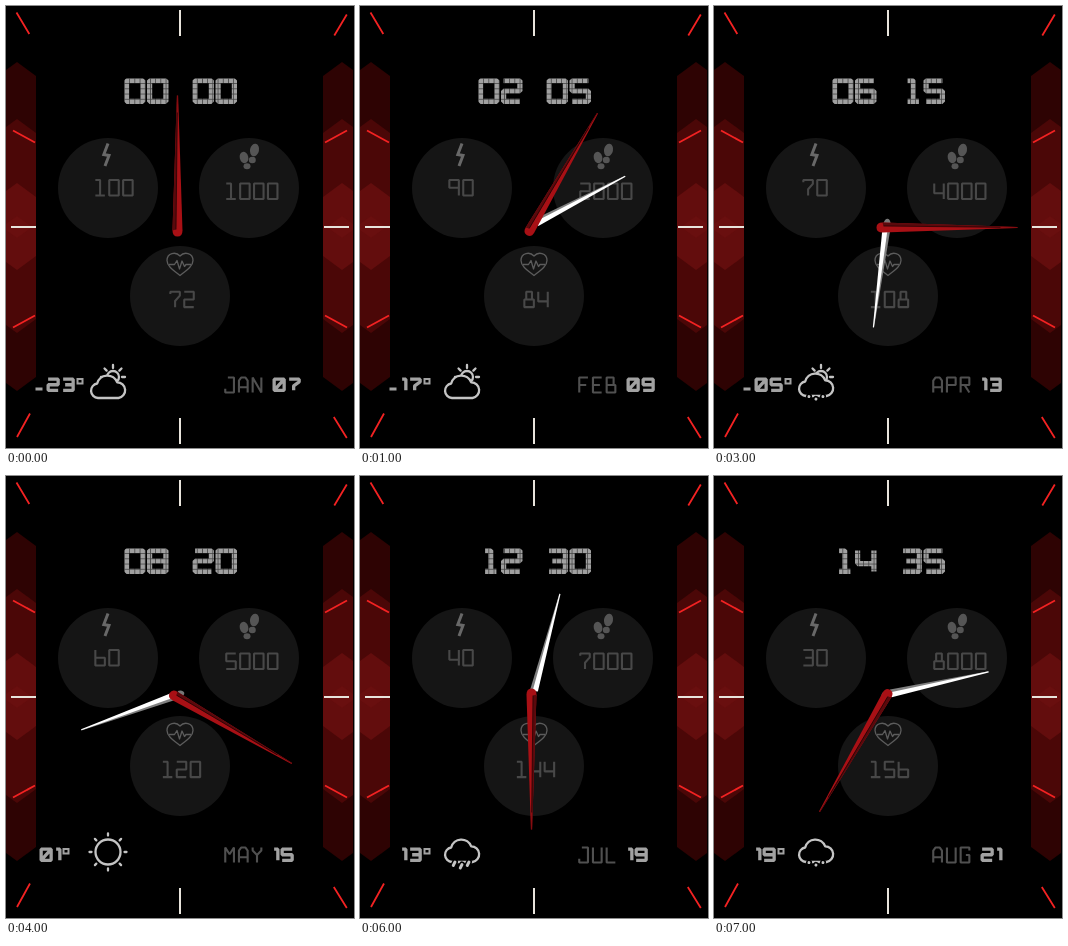
Recreate the animation shown at these times as an HTML page. Size 348x442 px, loop 8000 ms.

```html
<!DOCTYPE html>
<html lang="en">
<head>
<meta charset="utf-8">
<title>Watch face</title>
<style>
  html, body { margin: 0; width: 100%; height: 100%; overflow: hidden; background: #000; }
  svg { display: block; width: 348px; height: 442px; }
  .glyph { fill: none; stroke-linejoin: bevel; }
  .glyph path { vector-effect: non-scaling-stroke; }
  .line { fill: none; stroke: #c4c4c4; stroke-width: 2.3; stroke-linecap: round; stroke-linejoin: round; }
</style>
</head>
<body>
<svg viewBox="0 0 348 442" role="img" aria-label="Watch face">
  <defs>
    <pattern id="tile" width="5.2" height="5.2" x="118" y="72" patternUnits="userSpaceOnUse">
      <path d="M0 .4H5.2M.4 0V5.2" stroke="#000" stroke-width=".8" opacity=".6"/>
    </pattern>
    <g id="panel">
      <path fill="#2e0303" d="M0 64L11 56L30 70V371L11 385L0 377Z"/>
      <path fill="#4b0707" d="M0 121L11 113L30 127V313L11 327L0 319Z"/>
      <path fill="#630d0d" d="M0 185L11 177L30 191V250L11 264L0 256Z"/>
      <path fill="#690f0f" d="M0 218L11 210L26 221L11 232L0 224Z"/>
    </g>
    <path id="cloud" d="M92 392a7.300 7.300 0 0 1-.8-14.500a10.500 10.500 0 0 1 20-1.200a7.900 7.900 0 0 1 1.300 15.700z" fill="#000"/>
  </defs>
  <rect width="348" height="442"/>
  <use href="#panel"/>
  <use href="#panel" transform="matrix(-1 0 0 1 347 0)"/>
  <path stroke="#f22222" stroke-width="1.8" d="M10.500 6.500L23.300 28M340.800 8.500L328.300 29.500M7 124.500L29 136.500M341 124.500L319 136.500M7 321.500L29 309.500M341 321.500L319 309.500M11 431L24 407.500M327.800 411L340.800 432"/>
  <path stroke="#e8e4dc" stroke-width="2" d="M174 4V30M174 412V438M5 221H30M318 221H343"/>
  <g fill="#151515">
    <circle cx="102" cy="182" r="50"/><circle cx="243" cy="182" r="50"/><circle cx="174" cy="290" r="50"/>
  </g>
  <path fill="none" stroke="#686868" stroke-width="3" d="M102 137.500L97.800 148.500L103 149.500L99 160"/>
  <g fill="#555">
    <ellipse cx="238" cy="151.500" rx="4.300" ry="5.700" transform="rotate(-14 238 151.500)"/>
    <ellipse cx="241" cy="160.200" rx="3.500" ry="3"/>
    <ellipse cx="248.500" cy="144" rx="4.500" ry="6.300" transform="rotate(12 248.500 144)"/>
    <ellipse cx="246.300" cy="154" rx="3.500" ry="3.200"/>
  </g>
  <g fill="none" stroke="#5c5c5c" stroke-width="1.300" stroke-linejoin="round">
    <path d="M174 250C170 245.500 161 246.500 161 254.500C161 260 167 264 174 269.500C181 264 187 260 187 254.500C187 246.500 178 245.500 174 250Z"/>
    <path d="M163 258.500H168.500L171 254.500L173.500 263L176 255L178.500 260.500L180 258.500H185"/>
  </g>
  <g id="data"></g>
  <g id="hour">
    <path fill="#777" d="M-3.500 0A3.500 5.500 0 0 0 3.500 0Z"/>
    <path fill="#808080" d="M-.6-104L-4-4L0-3V-104Z"/>
    <path fill="#fff" d="M-.5-104H.6L4-4L-1.200-3Z"/>
  </g>
  <g id="minute">
    <path fill="#a81015" d="M-.6-132H.6L5 3Q5 9 0 9Q-5 9-5 3Z"/>
    <path fill="#5a090c" d="M-.6-132L-5 3L-1.500 2L0-132Z"/>
    <path stroke="#180203" stroke-width=".7" d="M-.2-115L-1.500 2"/>
  </g>
</svg>
<script>
// Glyphs live on a grid 2 wide and 4 high.
const glyphs = {
  0: "M0 0H2V4H0Z", 1: "M0 0H1V4M0 4H2", 2: "M0 0H2V2H0V4H2", 3: "M0 0H2V4H0M.4 2H2",
  4: "M0 0V2.500H2M2 0V4", 5: "M2 0H0V2H2V4H0", 6: "M2 0H0V4H2V2H0", 7: "M0 .6V0H2V1L1 2.400V4",
  8: "M0 0H2V4H0ZM0 2H2", 9: "M2 2H0V0H2V4H0",
  A: "M0 4V.8L.5 0H1.500L2 .8V4M0 2.600H2", B: "M0 2H1.600V0H0V4H2V2H1.600", E: "M2 0H0V4H2M0 2H1.600",
  F: "M2 0H0V4M0 2H1.600", G: "M2 .8V0H0V4H2V2H1.200", J: "M.6 0H2V4H0V3", L: "M0 0V4H2",
  M: "M0 4V0L1 1.800L2 0V4", N: "M0 4V0L2 4V0", P: "M0 4V0H2V2H0", R: "M0 4V0H2V2H0M.9 2L2 4",
  U: "M0 0V4H2V0", Y: "M0 0V.8L1 2L2 .8V0M1 2V4"
};
const thin = { ...glyphs, 6: "M0 0V4H2V2H0", 8: "M.4 0H1.600V2H2V4H0V2H.4ZM.4 2H1.600", 9: "M2 2H0V0H2V4" };
const bold = { ...glyphs, 0: glyphs[0] + "M.3 3.400L1.700 .6", 1: "M0 0H2V4", 7: "M0 0H2V1L.9 2.400V4" };

const styles = {
  clock: { set: glyphs, w: 21.5, h: 26, sw: 5.2, step: 23, color: "#a0a0a0", one: 16.5, pad: 4.5 },
  value: { set: thin, w: 11.6, h: 17.5, sw: 2.1, step: 13.9, color: "#484848" },
  small: { set: bold, w: 13.3, h: 14.5, sw: 3.3, step: 15, color: "#a2a2a2", one: 7, oneStep: 8 },
  month: { set: glyphs, w: 10.8, h: 17, sw: 2.1, step: 13.7, color: "#505050" }
};
const months = ["JAN", "FEB", "MAR", "APR", "MAY", "JUN", "JUL", "AUG"];
const skies = ["fair", "fair", "showers", "flurries", "sun", "cloud", "rain", "snow"];

const pad = n => String(n).padStart(2, "0");

function word(text, x, y, name) {
  const s = styles[name];
  let out = "";
  for (const c of String(text)) {
    const narrow = c === "1" && s.one;
    const w = narrow ? s.one : s.w;
    const left = x + (narrow && s.pad || 0) + s.sw / 2;
    out += `<path d="${s.set[c]}" transform="translate(${left} ${y + s.sw / 2}) scale(${(w - s.sw) / 2} ${(s.h - s.sw) / 4})"/>`;
    x += narrow && s.oneStep || s.step;
  }
  return `<g class="glyph" stroke="${s.color}" stroke-width="${s.sw}">${out}</g>`;
}

function rays(cx, cy, r1, r2, from, count) {
  let d = "";
  for (let k = from; k < from + count; k++) {
    const c = Math.cos(k * Math.PI / 4), s = Math.sin(k * Math.PI / 4);
    d += `M${cx + r1 * c} ${cy + r1 * s}L${cx + r2 * c} ${cy + r2 * s}`;
  }
  return `<path d="${d}"/>`;
}

function drops(y, len) {
  const d = [[95, 0], [102, 2.5], [109, 0]].map(([x, dy]) => `M${x} ${y + dy}l${-len / 2} ${len}`).join("");
  return `<path d="${d}" stroke="#000" stroke-width="6"/><path d="${d}" stroke-width="2.9"/>`;
}

function weather(sky) {
  const sunny = ["fair", "showers", "flurries"].includes(sky);
  const lift = { fair: 0, showers: -2, flurries: -2, cloud: -5, rain: -6, snow: -6 }[sky];
  let out = "";
  if (sky === "sun") {
    out = `<circle cx="102" cy="376" r="12.5"/>` + rays(102, 376, 16.5, 18.5, 0, 8);
  } else {
    if (sunny) out += `<circle cx="107" cy="371" r="6"/>` + rays(107, 371, 9, 12, 4, 5);
    out += `<use href="#cloud" y="${lift}"/>`;
    if (sky === "showers") out += drops(389, 2);
    if (sky === "flurries") out += drops(390.5, .1);
    if (sky === "rain") out += drops(386, 3.5);
    if (sky === "snow") out += drops(386.5, .1);
  }
  return `<g class="line">${out}</g>`;
}

function temperature(t) {
  const digits = pad(Math.abs(t));
  const last1 = digits[1] === "1";
  const x = last1 ? 33.5 : 40.5;
  const end = x + [...digits].reduce((sum, c) => sum + (c === "1" ? 8 : 15), 0);
  let out = "";
  if (last1 && t < 0) out += `<rect x="21" y="372" width="10" height="44"/>`;
  if (t < 0) out += `<rect x="${x - 11}" y="381.5" width="7" height="3" fill="#a2a2a2"/>`;
  return out + word(digits, x, 371.5, "small") +
    `<rect x="${end + 1}" y="373" width="5" height="4.5" fill="none" stroke="#a2a2a2" stroke-width="2"/>`;
}

const $ = id => document.getElementById(id);

function draw(i) {
  const h = 2 * i, m = 5 * i, pulse = 72 + 12 * i;
  $("data").innerHTML =
    word(pad(h), 118, 72, "clock") + word(pad(m), 186.5, 72, "clock") +
    `<rect x="117" y="71" width="116" height="28" fill="url(#tile)"/>` +
    word(100 - 10 * i, 88.3, 173, "value") +
    word(1000 * (i + 1), 219.2, 176.5, "value") +
    word(pulse, pulse < 100 ? 163.3 : 155.8, 284.7, "value") +
    temperature(6 * i - 23) + weather(skies[i]) +
    word(months[i], 218.2, 370.5, "month") + word(pad(7 + 2 * i), 266.5, 371.5, "small");
  $("hour").setAttribute("transform", `translate(173 218.3) rotate(${h * 30 + m / 2})`);
  $("hour").style.display = i ? "" : "none"; // fully covered at twelve
  $("minute").setAttribute("transform", `translate(171.5 221.5) rotate(${m * 6})`);
}

let shown = -1;
function tick() {
  const i = Math.floor(performance.now() / 1000) % 8;
  if (i !== shown) draw(shown = i);
  requestAnimationFrame(tick);
}
tick();
</script>
</body>
</html>
```
